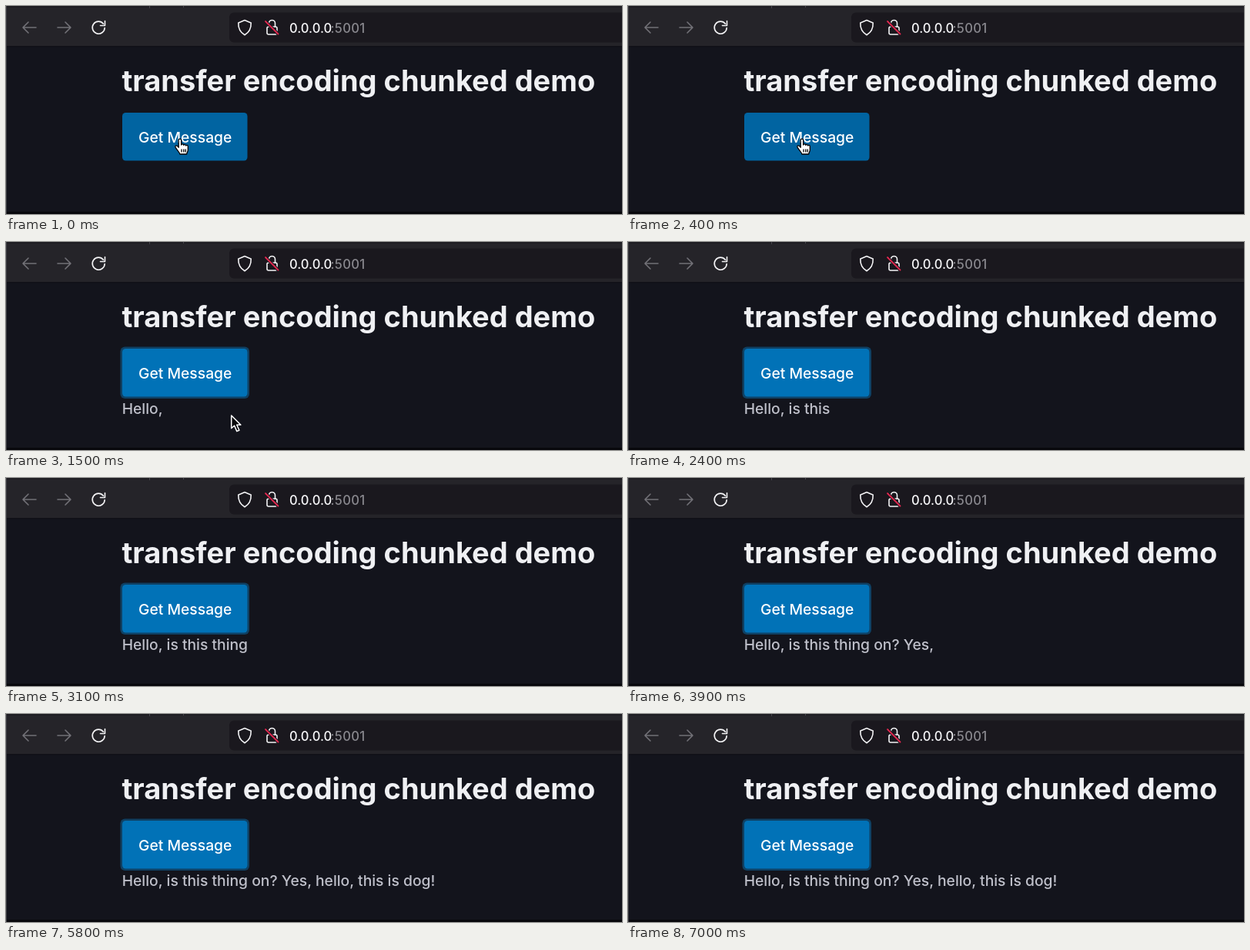
Animation, 800 px wide and 271 px high, one loop 7.1 s. Source, as an HTML page:

```html
<!DOCTYPE html>
<html lang="en">
<head>
<meta charset="utf-8">
<title>transfer encoding chunked demo</title>
<style>
  html, body { margin: 0; width: 100%; height: 100%; overflow: hidden; background: #13141c; }
  svg { display: block; font-family: Inter, "Noto Sans", sans-serif; }
  .icon { fill: none; stroke: #f4f4f6; stroke-width: 1.6; stroke-linecap: round; stroke-linejoin: round; }
  .dim { stroke: #727177; }
  .body { font-size: 19.3px; font-weight: 450; }
</style>
</head>
<body>
<svg width="800" height="271" viewBox="0 0 800 271">
  <rect width="800" height="271" fill="#13141c"/>

  <!-- browser toolbar -->
  <rect width="800" height="52.3" fill="#252429"/>
  <rect width="800" height="2" fill="#1e1d22"/>
  <path d="M186.5 0v3M230.5 0v2" stroke="#45444a"/>
  <rect y="52.3" width="800" height="1" fill="#0e0e13"/>
  <rect x="290" y="8.5" width="520" height="39" rx="6" fill="#1a181e"/>
  <path class="icon dim" d="M39 28H22M29 21l-7 7 7 7M67 28h17M77 21l7 7-7 7"/>
  <path class="icon" d="M126.5 23.2A8 8 0 1 0 128.2 28.5M128.5 19.5v6h-6"/>
  <path class="icon" d="M310 18.5l8.2 3.4c.3 7.2-2.3 12.4-8.2 15.8-5.9-3.4-8.5-8.6-8.2-15.8z"/>
  <path class="icon" d="M341.5 27v-4.5a4 4 0 0 1 8 0V27"/>
  <rect class="icon" x="339" y="27" width="13" height="10" rx="2"/>
  <path d="M337.5 20.5l16 16" stroke="#1a181e" stroke-width="4"/>
  <path d="M337 20l16.5 16.5" stroke="#e0284f" stroke-width="1.8" stroke-linecap="round"/>
  <g font-size="16.6" font-weight="500">
    <text x="368" y="34.5" fill="#f7f7f9">0.0.0.0</text>
    <text x="421.5" y="34.5" fill="#89888e" letter-spacing=".3">:5001</text>
  </g>

  <!-- page -->
  <text x="150.4" y="111" font-size="38" font-weight="700" fill="#eff0f3">transfer encoding chunked demo</text>
  <rect id="ring" x="148.5" y="136.5" width="167.5" height="67.5" rx="6" fill="#0f4164"/>
  <rect id="button" x="151" y="139" width="162.5" height="62.5" rx="4.5"/>
  <text class="body" x="172" y="177.5" fill="#fff">Get Message</text>
  <text class="body" id="message" x="150.7" y="224" fill="#bfc0ca"></text>

  <!-- window edges -->
  <rect y="268" width="800" height="3" fill="#08080c"/>
  <rect width="1" height="271" fill="#3e3e44"/>

  <g id="cursor" stroke-linejoin="round">
    <path id="hand" fill="#fff" stroke="#000" stroke-width="1.3"
      d="M-1.8 1.6C-1.8-.5 1.4-.5 1.6 1.6V8c.3-1.6 3-1.4 3.1.3.5-1.3 2.9-1 3 .7.6-1 2.6-.7 2.6 1v4.5c0 2.2-1.4 3.3-1.6 5.5H-.2c-.3-2.3-2.4-3.8-3.7-5.8-.9-1.3-2-2.6-2.2-3.8-.2-1.7 1.8-2 2.8-.8l1.5 1.7zM2 13.5v4M4.8 13.5v4M7.2 13.5v4"/>
    <path id="arrow" fill="#08080a" stroke="#fff" stroke-width="1.5"
      d="M.7 1V17.8l3.9-3.5 3.2 7.3 3.1-1.4-3.2-7h5.2z"/>
  </g>
</svg>
<script>
const LOOP = 7100, STEP = 100;
const CLICK = 600, FADE = 200;
const FIRST_WORD = 1200, WORD_GAP = 500;
const LEAVE = 1100, GONE = 1700;
const words = "Hello, is this thing on? Yes, hello, this is dog!".split(" ");
const el = id => document.getElementById(id);
const show = (id, on) => el(id).setAttribute("visibility", on ? "visible" : "hidden");
const mix = (a, b, k) => `rgb(${a.map((v, i) => Math.round(v + (b[i] - v) * k))})`;

function draw(t) {
  const lit = Math.min(1, Math.max(0, (t - CLICK) / FADE));
  el("button").setAttribute("fill", mix([1, 100, 161], [1, 114, 183], lit));
  el("ring").setAttribute("opacity", lit);

  const count = Math.max(0, Math.floor((t - FIRST_WORD) / WORD_GAP) + 1);
  el("message").textContent = words.slice(0, count).join(" ");

  // the pointer speeds up on its way out through the bottom edge
  const p = Math.max(0, (t - LEAVE) / 400);
  const x = 226 + 66 * p, y = 173 + 52 * p ** 1.8;
  const over = y < 203;
  el("cursor").setAttribute("transform", `translate(${x} ${y})`);
  show("hand", t < GONE && over);
  show("arrow", t < GONE && !over);
}

const start = performance.now();
function tick() {
  const t = (performance.now() - start) % LOOP;
  draw(Math.floor(t / STEP) * STEP);
  requestAnimationFrame(tick);
}
tick();
</script>
</body>
</html>
```
